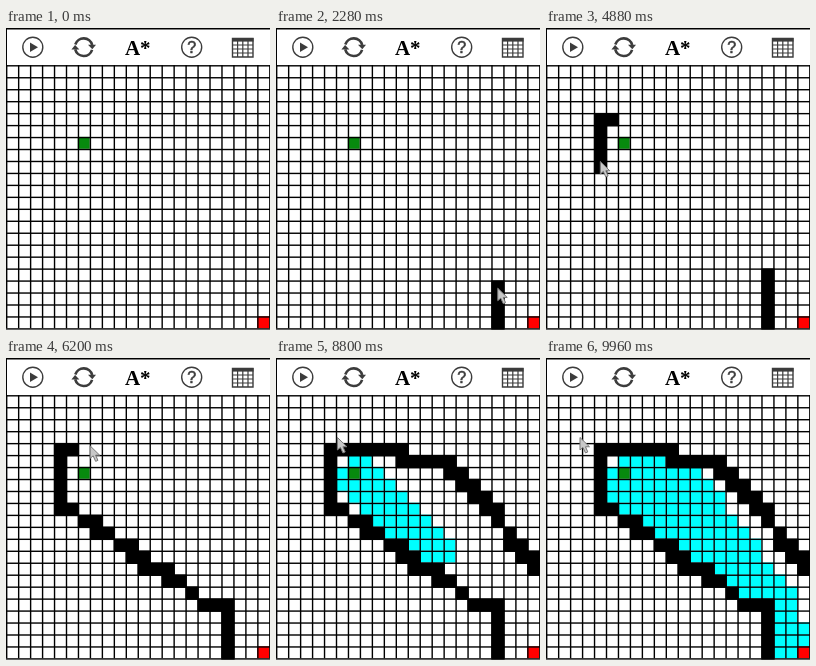
An HTML page with a canvas for the animation above (10 s loop, 264 px wide and 302 px high).

```html
<!DOCTYPE html>
<html lang="en">
<head>
<meta charset="utf-8">
<title>A* pathfinding</title>
<style>
  html, body { margin: 0; width: 264px; height: 302px; overflow: hidden; background: #fff; }
  svg, canvas { position: absolute; left: 0; top: 0; display: block; }
  text { text-anchor: middle; }
</style>
</head>
<body>
<svg width="264" height="302" fill="none" stroke="#3c3c3c" stroke-width="1.4">
  <circle cx="26.8" cy="19.2" r="10"/>
  <path d="M24 14.5V24L32 19.2Z" fill="#3c3c3c" stroke="none"/>
  <g id="arc">
    <path d="M69.3 16.5A8.8 8.8 0 0 1 86.2 17" stroke-width="2.6"/>
    <path d="M82 16.8H90L86.3 21.3Z" fill="#3c3c3c" stroke="none"/>
  </g>
  <use href="#arc" transform="rotate(180 77.7 19.2)"/>
  <text x="131.8" y="26.7" font-family="Liberation Serif, serif" font-size="21" font-weight="bold" fill="#000" stroke="none">A*</text>
  <circle cx="185.7" cy="19.2" r="10"/>
  <text x="185.7" y="25" font-family="Liberation Sans, sans-serif" font-size="16" fill="#3c3c3c" stroke-width=".6">?</text>
  <path d="M226.5 10.5H247V29H226.5Z"/>
  <path d="M226 11.8H247.5" stroke-width="3.6"/>
  <path d="M227 17H247M227 21H247M227 25H247M231.6 13V29M236.8 13V29M242 13V29" stroke-width="1.2"/>
  <path d="M0 .8H264" stroke="#000" stroke-width="1.6"/>
  <path d="M.5 0V38" stroke="#000" stroke-width="1"/>
</svg>
<canvas id="stage" width="264" height="302"></canvas>
<script>
const ctx = document.getElementById('stage').getContext('2d');
const LOOP = 10000, SIZE = 22, CELL = 11.96, TOP = 37.1, LINE = 1.4;
const START = [6, 6], GOAL = [21, 21];
const SEARCH_START = 8200, VISIT_MS = 16.1;
const key = (c, r) => r * SIZE + c;
const px = c => c * CELL, py = r => TOP + r * CELL;

// Pointer trip in grid units; each leg goes on from where the last one ended.
const legs = [];
let last = [22, 21];
function leg(from, to, points, draws = false) {
  legs.push({ from, to, draws, path: [last, ...points] });
  last = points[points.length - 1];
}
const move = (from, to, ...points) => leg(from, to, points);
const drag = (from, to, ...points) => leg(from, to, points, true);

move(560, 1120, [17.2, 16.3], [19.2, 20.6]);
move(1120, 1400, [18.5, 21.8]);
drag(1600, 2560, [18.5, 17.3]);
move(2800, 3360, [5.1, 6.8]);
move(3360, 3760, [5.6, 4.5]);
drag(3840, 4840, [4.5, 4.5], [4.5, 8]);
drag(4880, 5880, [4.5, 9.3], [6, 10], [9, 12], [11.8, 14.1], [15, 16], [16, 17], [17.9, 17.5]);
move(5920, 6200, [7, 4.2]);
move(6200, 6320, [6.1, 4.5]);
drag(6320, 7440, [10.8, 4.98], [14.5, 5.6], [18.4, 9.9], [19, 11], [19.5, 12.1], [21.8, 14.3]);
move(7600, 7960, [2, -1.7]);
move(8200, 8800, [5.1, 3.5]);
move(8800, 9160, [2.8, 3.5]);

// Point at fraction k of a polyline's length.
function pointAt(path, k) {
  const span = i => Math.hypot(path[i + 1][0] - path[i][0], path[i + 1][1] - path[i][1]);
  let rest = 0, i = 0;
  for (let j = 0; j < path.length - 1; j++) rest += span(j);
  rest *= k;
  while (i < path.length - 2 && rest > span(i)) rest -= span(i++);
  const [a, b] = [path[i], path[i + 1]], f = Math.min(1, rest / span(i));
  return [a[0] + (b[0] - a[0]) * f, a[1] + (b[1] - a[1]) * f];
}

// Dragging fills every cell the pointer passes through.
const walls = new Map();
for (const { from, to, path } of legs.filter(l => l.draws)) {
  const samples = 500;
  for (let i = 0; i < samples; i++) {
    const k = (i + 0.5) / samples;
    const [c, r] = pointAt(path, k).map(Math.floor);
    if (!walls.has(key(c, r))) walls.set(key(c, r), { c, r, t: from + (to - from) * k });
  }
}

// A* over four neighbours; returns cells in the order they enter the open set.
function search() {
  const seen = new Set(walls.keys());
  const score = (c, r, g) => g + Math.sqrt(2 * ((GOAL[0] - c) ** 2 + (GOAL[1] - r) ** 2));
  const open = [{ c: START[0], r: START[1], g: 0, f: 0 }];
  const order = [];
  seen.add(key(...START));
  while (open.length) {
    let best = 0;
    open.forEach((n, i) => { if (n.f < open[best].f - 1e-9) best = i; });
    const { c, r, g } = open.splice(best, 1)[0];
    for (const [dc, dr] of [[1, 0], [0, 1], [-1, 0], [0, -1]]) {
      const x = c + dc, y = r + dr;
      if (x < 0 || y < 0 || x >= SIZE || y >= SIZE || seen.has(key(x, y))) continue;
      if (x === GOAL[0] && y === GOAL[1]) return order;
      seen.add(key(x, y));
      order.push([x, y]);
      open.push({ c: x, r: y, g: g + 1, f: score(x, y, g + 1) });
    }
  }
  return order;
}
const visited = search();

function fillCell(c, r, color, extra = 0) {
  ctx.fillStyle = color;
  ctx.fillRect(px(c), py(r), CELL + extra, CELL + extra);
}

function drawGrid() {
  ctx.fillStyle = '#000';
  for (let i = 0; i <= SIZE; i++) {
    ctx.fillRect(px(i), TOP, LINE, SIZE * CELL);
    ctx.fillRect(0, py(i), 264, LINE);
  }
}

const arrow = new Path2D('M.5 .5V13L3.5 10.5L6 16L8.3 15L6 9.8H10Z');
function drawPointer(t) {
  const current = legs.filter(l => l.from <= t).pop();
  if (!current) return;
  const { from, to, path } = current;
  const [c, r] = pointAt(path, Math.min(1, (t - from) / (to - from)));
  ctx.save();
  ctx.translate(px(c), py(r));
  ctx.fillStyle = '#c8c8c8';
  ctx.strokeStyle = '#777';
  ctx.fill(arrow);
  ctx.stroke(arrow);
  ctx.restore();
}

function frame(now) {
  const t = now % LOOP;
  ctx.clearRect(0, 0, 264, 302);
  const count = Math.max(0, Math.floor((t - SEARCH_START) / VISIT_MS));
  for (const [c, r] of visited.slice(0, count)) fillCell(c, r, '#00ffff');
  fillCell(...START, '#078a0e');
  fillCell(...GOAL, '#ff0000');
  drawGrid();
  for (const w of walls.values()) if (w.t <= t) fillCell(w.c, w.r, '#000', LINE);
  drawPointer(t);
  requestAnimationFrame(frame);
}
requestAnimationFrame(frame);
</script>
</body>
</html>
```
